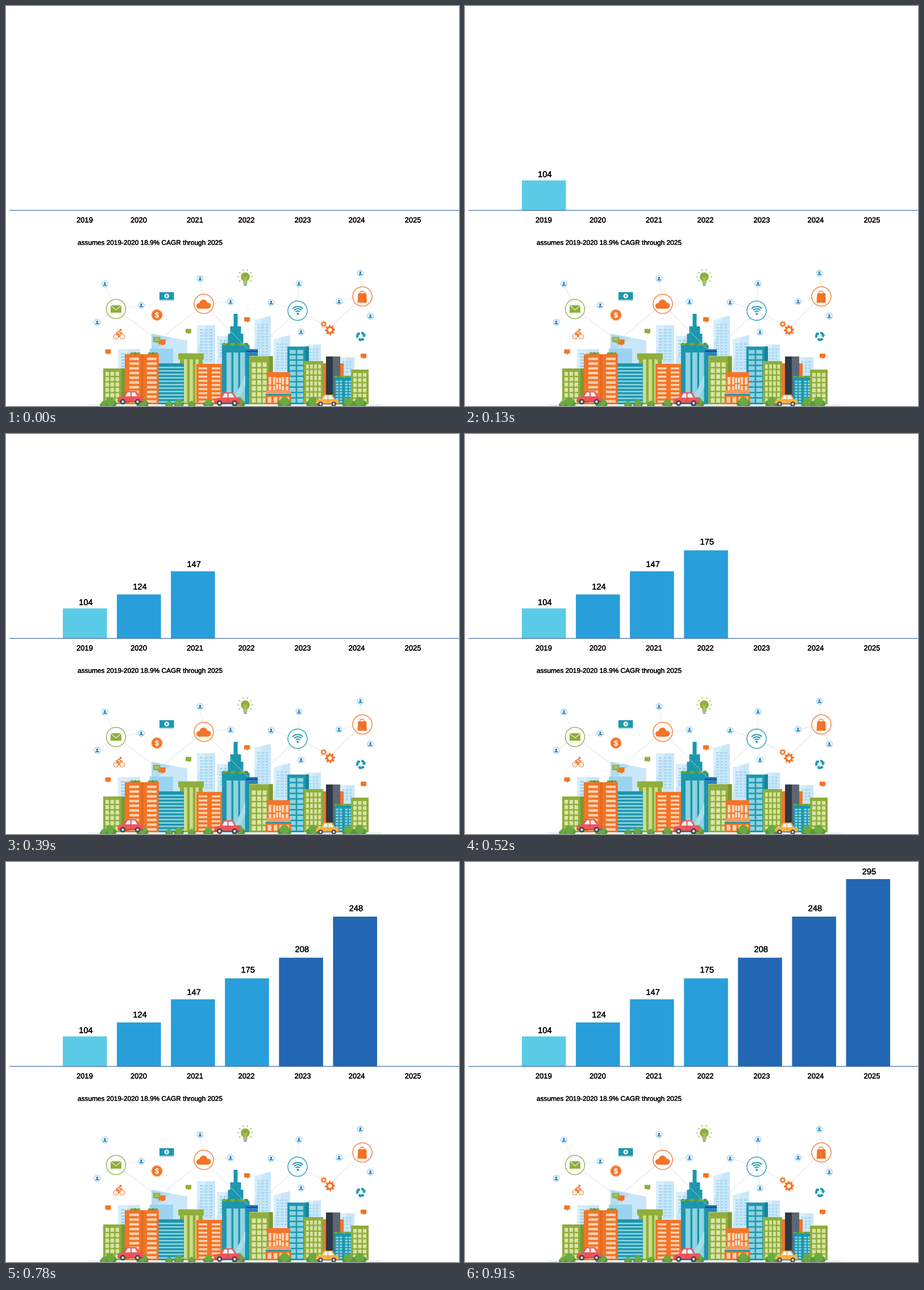
Write a matplotlib script that moves like this. It is 797x703 px and loops after 1.04 s.

```python
import math

import matplotlib.pyplot as plt
from matplotlib.animation import FuncAnimation
from matplotlib.colors import to_rgb
from matplotlib.patches import Circle, Polygon, Rectangle, Wedge
from matplotlib.patheffects import withStroke

W, H, DPI = 797, 703, 64
PT = 72 / DPI  # points per pixel
STREET = 700

GREEN, PALE_GREEN = "#8fae3c", "#d9e5a6"
ORANGE, PEACH = "#f47427", "#fbd3b3"
TEAL, PALE_TEAL = "#1c97ae", "#8fd3e0"
SKY, DEEP_SKY = "#c9e7f9", "#9bd4f2"
LEAF, DARK_LEAF = "#6aab41", "#56983a"
RED, YELLOW, BLUE = "#ef545c", "#fbb040", "#2b8fd0"

plt.rcParams.update({
    "font.family": "Liberation Sans",
    "text.hinting": "none",
    "lines.solid_capstyle": "butt",
})
fig = plt.figure(figsize=(W / DPI, H / DPI), dpi=DPI, facecolor="white")
ax = fig.add_axes([0, 0, 1, 1])
ax.set(xlim=(0, W), ylim=(H, 0))
ax.axis("off")


def shade(color, k=0.87):
    return tuple(k * c for c in to_rgb(color))


def polar(x, y, r, deg):
    a = math.radians(deg)
    return x + r * math.cos(a), y - r * math.sin(a)


def put(patch):
    patch.set(zorder=2, snap=False)
    return ax.add_patch(patch)


def rect(x0, y0, x1, y1, color):
    return put(Rectangle((x0, y0), x1 - x0, y1 - y0, fc=color, lw=0))


def poly(points, color):
    return put(Polygon(points, closed=True, fc=color, lw=0))


def disc(x, y, r, color):
    return put(Circle((x, y), r, fc=color, lw=0))


def dome(x, y, r, color):
    return put(Wedge((x, y), r, 180, 360, fc=color, lw=0))


def ring(x, y, r, color, width=1.3):
    return put(Circle((x, y), r, fc="white", ec=color, lw=width * PT))


def line(points, color, width=1.0, **style):
    ax.plot(*zip(*points), color=color, lw=width * PT, zorder=2, snap=False,
            **style)


def arc(x, y, r, start, stop, color, width):
    line([polar(x, y, r, start + (stop - start) * i / 16) for i in range(17)],
         color, width)


def label(x, y, text, size, color="black", ha="center"):
    stroke = withStroke(linewidth=0.35 * PT, foreground=color)
    return ax.text(x, y, text, fontsize=size * PT, color=color, ha=ha,
                   va="baseline", zorder=2, path_effects=[stroke])


def grid(x0, y0, x1, y1, cols, rows, color, gap):
    w = (x1 - x0 + gap) / cols
    h = (y1 - y0 + gap) / rows
    for c in range(cols):
        for r in range(rows):
            x, y = x0 + c * w, y0 + r * h
            rect(x, y, x + w - gap, y + h - gap, color)


def building(x0, x1, top, wall, pane, cols, rows, inset=4, gap=2.5, sill=6,
             side=0):
    rect(x0, top, x1, STREET, wall)
    if side:
        rect(x1 - side, top, x1, STREET, shade(wall))
    grid(x0 + inset, top + sill, x1 - side - inset, STREET - 3, cols, rows,
         pane, gap)


def haze(x0, x1, left_top, right_top, rows):
    """Pale tower in the distance with a sloping roof."""
    poly([(x0, left_top), (x1, right_top), (x1, STREET), (x0, STREET)], SKY)
    poly([(x0, left_top), ((x0 + x1) / 2, (left_top + right_top) / 2),
          (x0, left_top + 45)], "#d8eefb")
    top = max(left_top, right_top) + 7
    grid(x0 + 5, top, x1 - 5, top + 5 * rows, 3, rows, DEEP_SKY, 3)


def roof_garden(x0, x1, y, n):
    step = (x1 - x0) / n
    for i in range(n):
        dome(x0 + (i + 0.5) * step, y, 0.62 * step, (LEAF, DARK_LEAF)[i % 2])


def bush(x, r):
    y = H - 0.9 * r
    for dx in (-0.7, 0.7):
        disc(x + dx * r, y + 0.45 * r, 0.65 * r, DARK_LEAF)
    disc(x, y, 0.9 * r, LEAF)


def car(x, base, w, color):
    s = w / 46

    def at(*points):
        return [(x + px * s, base + py * s) for px, py in points]

    poly(at((0, -5), (1, -12), (11, -14), (16, -23), (33, -23), (38, -14),
            (45, -12), (46, -5)), color)
    poly(at((14, -14), (18, -21), (23, -21), (23, -14)), "#e8f3f6")
    poly(at((25, -14), (25, -21), (31, -21), (35, -14)), "#e8f3f6")
    line(at((1, -4.5), (45, -4.5)), "#69434a", 1.2)
    line(at((24, -13), (24, -6)), shade(color, 0.8), 0.7)
    for px in (9.5, 35.5):
        wheel = at((px, -4.5))[0]
        disc(*wheel, 4.7 * s, "#3d3f48")
        disc(*wheel, 2.3 * s, "#d9dde0")


def distance():
    haze(197, 236, 603, 603, 6)
    haze(529, 554, 595, 595, 5)
    haze(587, 613, 617, 617, 4)
    haze(336, 368, 561, 561, 11)
    haze(371, 401, 580, 580, 6)
    haze(437, 466, 552, 544, 11)
    haze(471, 500, 586, 578, 9)
    poly([(256, 576), (319, 588), (319, STREET), (256, STREET)], SKY)
    poly([(256, 576), (290, 582.5), (268, 602), (256, 602)], "#b3dcf4")
    rect(253, 602, 294, STREET, DEEP_SKY)


def left_blocks():
    building(171, 210, 637, GREEN, PALE_GREEN, 3, 6, side=7)

    rect(209, 612, 269, STREET, ORANGE)
    for x in (213, 244):
        building(x, x + 25, 612, ORANGE, PEACH, 1, 10, gap=4)
        roof_garden(x + 6, x + 23, 612, 3)
    rect(237, 612, 242, STREET, shade(ORANGE, 0.93))

    building(306, 346, 621, GREEN, "#cddd8d", 3, 1, inset=7, gap=4.5, sill=0)
    rect(303, 610.5, 348, 621, GREEN)
    building(268.5, 313, 628, TEAL, PALE_TEAL, 1, 11, inset=0.5, gap=3.4)

    for x in (335, 358):
        building(x, x + 23, 629, ORANGE, PEACH, 1, 9, gap=3.7)


def tower():
    for half, top in ((3.5, 541), (9.5, 563), (13.5, 576)):
        rect(404 - half, top, 404 + half, 600, TEAL)
    building(380, 428.5, 596, TEAL, PALE_TEAL, 3, 1, inset=8, gap=3.5, sill=13)
    poly([(398, 697), (421, 648), (421, 668), (407, 697)], "#a9dee8")
    roof_garden(380, 426, 596.5, 6)


def shop():
    building(460, 499, 646, ORANGE, PEACH, 5, 3, inset=2)
    rect(474, 652, 485, 676, ORANGE)
    grid(475.5, 653, 483.5, 674, 2, 2, "#fff0e2", 2)
    rect(458.5, 643.5, 500, 652, ORANGE)
    poly([(460, 675), (499, 675), (502, 682), (457, 682)], "#f89a60")
    building(456.5, 502, 683, ORANGE, PEACH, 4, 1, gap=4, sill=4)
    rect(457, 682, 502, 684.5, TEAL)


def right_blocks():
    building(428.5, 469.5, 615.5, GREEN, PALE_GREEN, 3, 7, sill=11, side=7)
    building(495, 533, 598.5, TEAL, PALE_TEAL, 2, 10, side=6)
    shop()
    rect(556, 628, 594, STREET, ORANGE)
    rect(563, 616, 575, STREET, "#2e3844")
    rect(575, 616, 588, STREET, "#5e6670")
    building(524, 558, 624, GREEN, PALE_GREEN, 4, 7)
    for x in (578, 594):
        building(x, x + 16, 652.5, TEAL, PALE_TEAL, 2, 8, inset=2.5, gap=2)
        roof_garden(x, x + 14, 652.5, 3)
    building(607, 638, 639, GREEN, PALE_GREEN, 3, 6)


def street():
    rect(145, STREET, 661, H, "#e6f4f8")
    for x in (183, 240, 304, 356, 409, 490, 540, 602, 622):
        bush(x, 7.5 + 1.5 * math.cos(x))
    for x in (172, 287, 327):
        bush(x, 5)
    car(196, 700, 46, RED)
    car(366, 702.5, 47, RED)
    car(545, 703.5, 41, YELLOW)


def person(x, y):
    ring(x, y, 5.3, "#8fcaec", 1.1)
    disc(x, y - 1.5, 1.7, "#2273b8")
    dome(x, y + 3.4, 3.2, BLUE)


def network():
    mail, cloud, wifi, bag = (193.5, 532.5), (348, 523.5), (513, 535.5), (627, 510.5)
    people = {
        mail: [(174, 488.5), (238, 526), (160.5, 556)],
        cloud: [(341.5, 479), (395, 520)],
        wifi: [(466.5, 521), (515.5, 488), (519, 573)],
        bag: [(623.5, 469.5), (586, 519.5), (641, 545)],
    }
    for hub, spots in people.items():
        for spot in spots:
            line([hub, spot], "#e3e6e8", 0.9)
            person(*spot)
    for a, b in ((mail, (266, 586)), (cloud, (273, 585)), (cloud, (427, 604)),
                 (wifi, (441, 604)), (wifi, (560, 560)), (bag, (572, 564))):
        line([a, b], "#cfd4d6", 1, dashes=(2.2, 1.6))
    for hub, color in zip(people, (GREEN, ORANGE, TEAL, ORANGE)):
        ring(*hub, 17, color)


def hub_icons():
    rect(184, 526, 203, 539, GREEN)
    line([(184, 526.5), (193.5, 534), (203, 526.5)], "white", 1)

    for x, y, r in ((340, 527, 5), (347.5, 523, 7), (355.5, 526.5, 5)):
        disc(x, y, r, ORANGE)
    rect(340, 525, 355.5, 532, ORANGE)

    disc(513.3, 541, 1.9, TEAL)
    for r in (4.8, 8.8, 12.8):
        arc(513.3, 541, r, 45, 135, TEAL, 2)

    poly([(619.5, 505), (634, 505), (635, 521.5), (618.5, 521.5)], ORANGE)
    arc(626.5, 505, 4, 0, 180, ORANGE, 1.3)
    line([(631, 505), (631, 521)], shade(ORANGE), 0.7)


def screen():
    rect(270, 503, 295.5, 516.5, TEAL)
    disc(282.8, 509.7, 4.2, "white")
    poly([(281.5, 507.5), (281.5, 511.9), (285.3, 509.7)], TEAL)
    line([(270, 518), (295.5, 518)], "#9ccfdb", 1)


def coin():
    disc(265.5, 543, 10, "#f9a877")
    disc(265.5, 543, 8.7, ORANGE)
    label(265.5, 547.6, "$", 13, "white")


def bulb():
    x, y = 421, 476
    disc(x, y, 7.8, GREEN)
    rect(x - 3.5, y + 4, x + 3.5, y + 12.5, GREEN)
    for side in (-1, 1):
        line([(x + 3 * side, y), (x + side, y + 3), (x + side, y + 9)],
             PALE_GREEN, 0.8)
    line([(x - 3.5, y + 10), (x + 3.5, y + 10)], "white", 0.6)
    line([(x - 2.5, y + 14.5), (x + 2.5, y + 14.5)], "#3c5f93", 1.6)
    for deg in range(-36, 217, 36):
        line([polar(x, y, r, deg) for r in (10.5, 14)], GREEN, 1.1)


def cyclist():
    for x in (193.5, 204.5):
        ring(x, 581, 4.2, ORANGE, 1)
    line([(193.5, 581), (196, 576), (203, 576), (199, 581), (196, 576)],
         ORANGE, 0.9)
    line([(198, 582), (199, 577), (194, 575), (199, 571.5), (201.5, 574.5),
          (205, 574.5)], ORANGE, 1.8)
    disc(201.5, 569.3, 2, ORANGE)


def bubble(x, y, color, w=10):
    h = 0.74 * w
    rect(x, y, x + w, y + h, color)
    poly([(x + w * 0.45, y + h - 0.5), (x + w * 0.75, y + h - 0.5),
          (x + w * 0.6, y + h + 2.5)], color)


def gear(x, y, r):
    poly([polar(x, y, r if i % 4 < 2 else 0.72 * r, 11.25 * i)
          for i in range(32)], ORANGE)
    disc(x, y, 0.37 * r, "white")


def recycle(x, y, r):
    for start in (20, 140, 260):
        put(Wedge((x, y), r, -start - 62, -start, width=0.5 * r, fc=TEAL, lw=0))
        poly([polar(x, y, 1.2 * r, start), polar(x, y, 0.3 * r, start),
              polar(x, y, 0.8 * r, start - 38)], TEAL)


def loose_icons():
    screen()
    coin()
    bulb()
    cyclist()
    bubble(316, 567.5, GREEN)
    for x, y in ((419, 547), (174.5, 603.5), (624, 611)):
        bubble(x, y, ORANGE)
    bubble(268.5, 586, ORANGE, 12)
    bubble(259, 581.5, GREEN, 12.5)
    for y in (584.3, 587):
        line([(261.5, y), (269, y)], PALE_GREEN, 0.9)
    gear(570, 569.5, 9.2)
    gear(559, 559, 5.6)
    recycle(624.3, 580.5, 8.3)
    rect(422, 603, 443, 615, "#2b82bd")
    rect(422, 605.5, 443, 608, "#1d4f80")


def chart():
    base, pitch, width = 359, 95.08, 77.5
    tops = (306.5, 282, 241.3, 204.5, 168.2, 96, 30)
    value_lines = (300.7, 273.2, 233.8, 194.3, 158.2, 86.2, 21.8)
    year_centers = (138.5, 233.5, 332.5, 423, 522, 617, 716)
    columns = []
    for i, top in enumerate(tops):
        color = "#5acbe6" if i == 0 else "#289fdb" if i < 4 else "#2267b3"
        left = 100 + pitch * i
        value = round(104 * 1.1895 ** i)
        columns.append((rect(left, top, left + width, base, color),
                        label(left + 40.5, value_lines[i], value, 14.7)))
        label(year_centers[i], 380.5, 2019 + i, 13)
    line([(6, base + 0.3), (W, base + 0.3)], "#4f77ae", 1.3)
    label(126, 419.8, "assumes 2019-2020 18.9% CAGR through 2025", 11.85,
          ha="left")
    return columns


for part in (distance, left_blocks, tower, right_blocks, street, network,
             hub_icons, loose_icons):
    part()
columns = chart()


def update(step):
    for i, column in enumerate(columns):
        for artist in column:
            artist.set_visible(i < step)


anim = FuncAnimation(fig, update, frames=len(columns) + 1, interval=130,
                     repeat=True, repeat_delay=0, blit=False)
plt.show()
```
